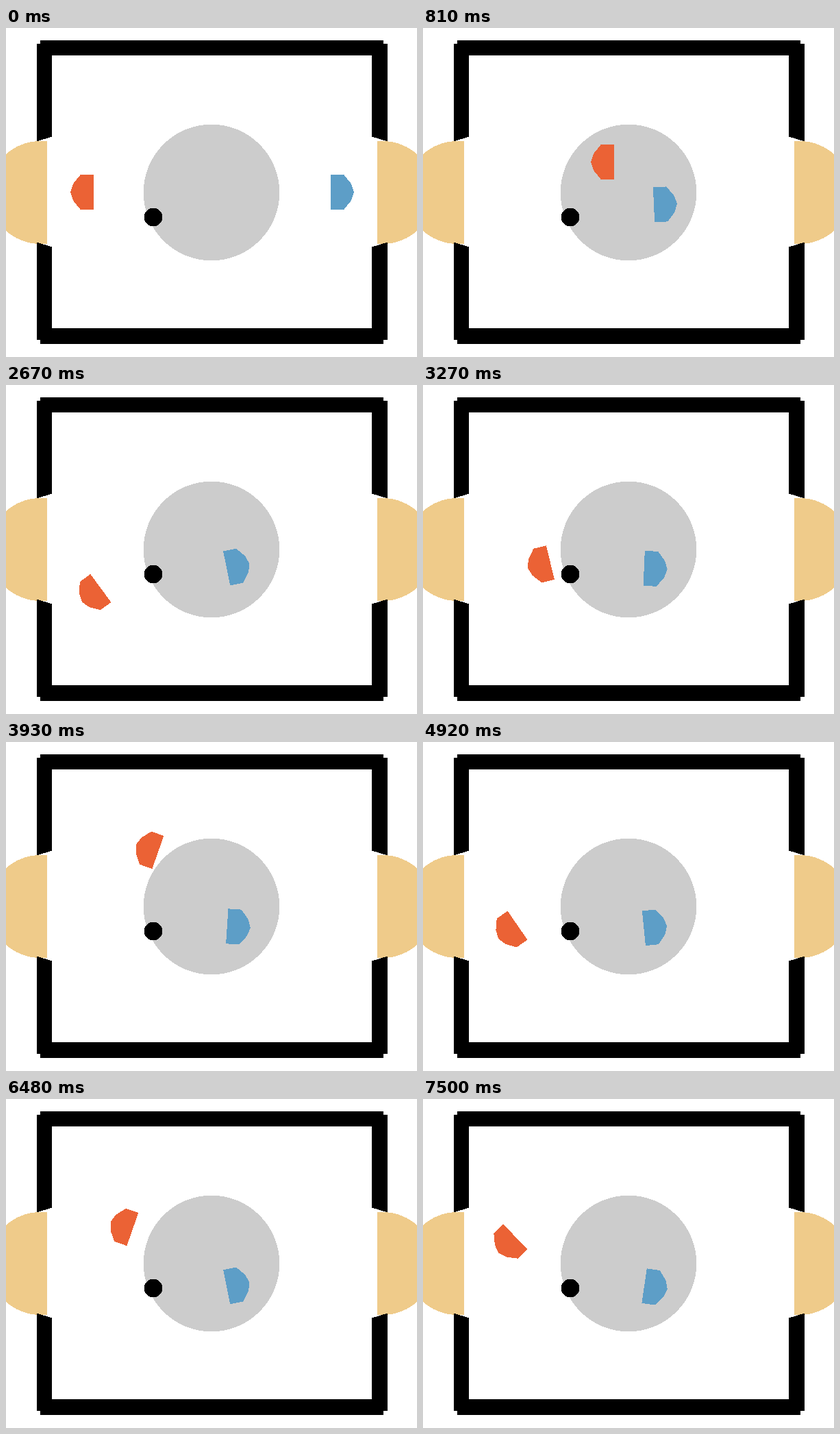
Animation of 600 by 480 pixels, one loop 7.53 s. Source, as an HTML page:

```html
<!DOCTYPE html>
<html lang="en">
<head>
<meta charset="utf-8">
<title>Air hockey</title>
<style>
  html, body { margin: 0; width: 100%; height: 100%; overflow: hidden; background: #fff; }
  svg { display: block; width: 600px; height: 480px; shape-rendering: crispEdges; }
</style>
</head>
<body>
<svg viewBox="0 0 600 480">
  <circle cx="300" cy="240" r="99.3" fill="#ccc"/>
  <g fill="#efcb8a">
    <path d="M60 165H50a75 75 0 0 0 0 150H60Z"/>
    <path d="M542 165H550a75 75 0 0 1 0 150H542Z"/>
  </g>
  <path d="M50 18H550L551 19V23H556L557 24V165.5L534 158.5V40H67V158.5L45 165.5V23H50Z"/>
  <path d="M50 461H551V455H557V312.5L534 319.5V438H67V319.5L45 312.5V455H50Z"/>
  <polygon id="red" fill="#eb6235" stroke="#eb6235"/>
  <polygon id="blue" fill="#5d9ec7" stroke="#5d9ec7"/>
  <circle cx="215" cy="276" r="13.4"/>
</svg>
<script>
const LOOP = 7530, STEP = 30;
const HALF_RACKET = [[-7, -25], [11.5, -25], [22, -12], [26, 0], [22, 12], [11.5, 25], [-7, 25]];
const DASH_END = 810, ORBIT_START = 2100;

const clamp = u => Math.min(1, Math.max(0, u));
const progress = (t, from, to) => clamp((t - from) / (to - from));
const smooth = u => u * u * (3 - 2 * u);
const mix = (a, b, u) => a + (b - a) * u;
// Swings between 0 and 1, reaching 1 at the peak time
const wave = (t, peak, period) => (1 + Math.cos(2 * Math.PI * (t - peak) / period)) / 2;

// A shrinking loop in front of the left goal, tilting as it goes round
function orbit(t) {
  return {
    x: 134 - t / 1200 + (128.2 - t / 90) * wave(t, 3850, 2350),
    y: 158 + (207 - t * 0.0187) * (1 - wave(t, 3940, 2120)),
    angle: 19.5 - (50 + t / 450) * (1 - wave(t, 3950, 2480))
  };
}

// Dashes to the centre line, falls back, then circles
function redPose(t) {
  const dash = progress(t, 0, 680) ** 2;
  const back = progress(t, DASH_END, ORBIT_START);
  const u = back * (1.4 - 0.4 * back);
  const loop = orbit(Math.max(t, ORBIT_START));
  return {
    x: mix(mix(120, 271, dash), loop.x, u),
    y: mix(mix(239, 195, dash), loop.y, u),
    angle: loop.angle * u
  };
}

// Backs off, dashes to the centre line, then sways there
function bluePose(t) {
  const angle = smooth(progress(t, 200, 2200)) * (8.5 - 20 * wave(t, 2670, 1905));
  const retreat = 17 * smooth(progress(t, 0, 260));
  const dash = 154 * (Math.max(0, t - 260) / 550) ** 1.7;
  return {
    x: Math.max(329.6 + angle / 20, 481 + retreat - dash),
    y: 275 - 23 * Math.exp(-t / 3000) - 13 * Math.exp(-t / 250),
    angle
  };
}

function makeRacket(id, pose, side) {
  const node = document.getElementById(id);
  node.setAttribute("points", HALF_RACKET.map(([x, y]) => [x * side, y]).join(" "));
  return t => {
    const { x, y, angle } = pose(t);
    node.setAttribute("transform", `translate(${x + 0.5} ${y + 0.5}) rotate(${angle})`);
  };
}

const rackets = [makeRacket("red", redPose, -1), makeRacket("blue", bluePose, 1)];
const start = performance.now();

function draw(now) {
  const elapsed = Math.max(0, now - start) % LOOP;
  const t = Math.floor(elapsed / STEP) * STEP;
  rackets.forEach(place => place(t));
  requestAnimationFrame(draw);
}
draw(start);
</script>
</body>
</html>
```
